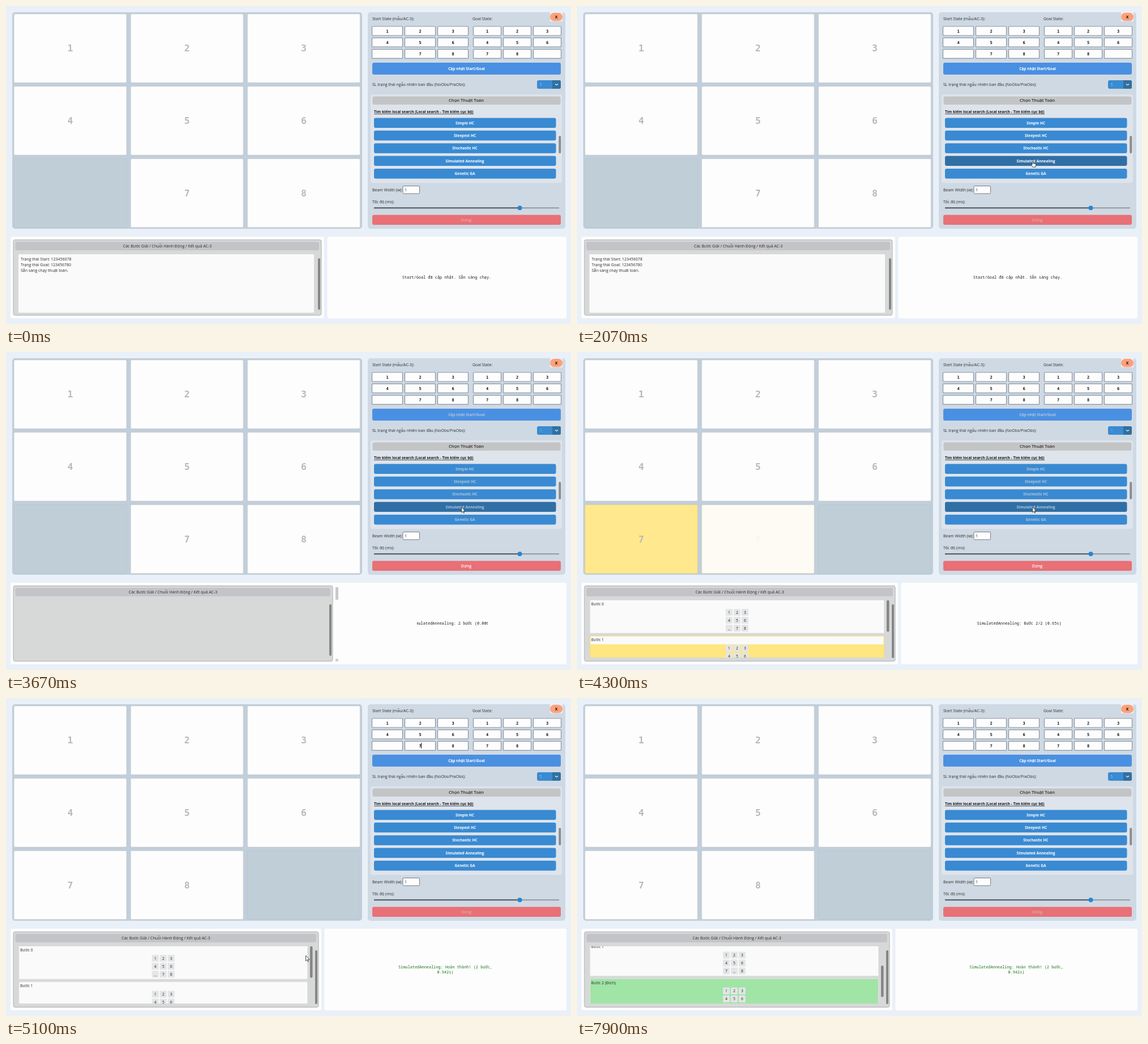
An HTML page with a canvas for the animation above (8030 ms loop, 998 by 561 pixels).

```html
<!DOCTYPE html>
<html lang="vi">
<head>
<meta charset="utf-8">
<title>8-puzzle</title>
<style>
html, body { margin: 0; width: 100%; height: 100%; overflow: hidden; background: #eaf0f8; }
canvas { display: block; }
</style>
</head>
<body>
<canvas id="stage" width="998" height="561"></canvas>
<script>
const ctx = document.getElementById('stage').getContext('2d');
const LOOP = 8030;
const FAIL = 2660, FOUND = 3640, LISTED = 3700, STEP1 = 3960, STEP2 = 4285, DONE = 4590;
const UI = '"Open Sans", "Noto Sans", sans-serif';
const MONO = '"Noto Sans Mono", monospace';
const DIGITS = '"DejaVu Sans Mono", monospace';
const BOARDS = ['123456 78', '1234567 8', '12345678 '];
const ALGORITHMS = ['Simple HC', 'Steepest HC', 'Stochastic HC', 'Simulated Annealing', 'Genetic GA'];
const CURSOR = [[750, 905, 400], [1270, 812.5, 266], [1700, 806, 272], [2300, 804.5, 274],
  [4640, 804.5, 273.5], [5100, 529.5, 454.5], [6600, 527, 462]];

const clamp = v => Math.min(1, Math.max(0, v));
const ease = v => { v = clamp(v); return v * v * (3 - 2 * v); };
const pulse = (t, from, to, rise, fall) => clamp((t - from) / rise) * (1 - clamp((t - to) / fall));

function box(x1, y1, x2, y2, fill, radius = 0, stroke, width = 1) {
  ctx.beginPath();
  ctx.roundRect(x1, y1, x2 - x1, y2 - y1, radius);
  if (fill) { ctx.fillStyle = fill; ctx.fill(); }
  if (stroke) { ctx.strokeStyle = stroke; ctx.lineWidth = width; ctx.stroke(); }
}

// y is the middle of the x-height band plus ascenders, about 0.36em above the baseline
function text(str, x, y, { size = 7, weight = 400, color = '#2c2c2c', align = 'left', family = UI } = {}) {
  ctx.font = `${weight} ${size}px ${family}`;
  ctx.textAlign = align;
  ctx.fillStyle = color;
  ctx.fillText(str, x, y + size * 0.36);
}

function line(x1, y1, x2, y2, color, width) {
  ctx.strokeStyle = color;
  ctx.lineWidth = width;
  ctx.beginPath();
  ctx.moveTo(x1, y1);
  ctx.lineTo(x2, y2);
  ctx.stroke();
}

function withAlpha(alpha, draw) {
  ctx.save();
  ctx.globalAlpha = alpha;
  draw();
  ctx.restore();
}

function clipped(x1, y1, x2, y2, draw) {
  ctx.save();
  ctx.beginPath();
  ctx.rect(x1, y1, x2 - x1, y2 - y1);
  ctx.clip();
  draw();
  ctx.restore();
}

function cursorAt(t) {
  const i = CURSOR.findIndex(k => k[0] > t);
  if (i < 1) return null;
  const [t0, x0, y0] = CURSOR[i - 1], [t1, x1, y1] = CURSOR[i];
  const p = ease((t - t0) / (t1 - t0));
  return { x: x0 + (x1 - x0) * p, y: y0 + (y1 - y0) * p };
}

function drawBoard(t) {
  const step = t < STEP1 ? 0 : t < STEP2 ? 1 : 2;
  const red = pulse(t, FAIL, 3150, 50, 300);
  const flashes = { 6: pulse(t, STEP1, STEP2, 200, 150), 7: pulse(t, STEP2, DONE, 200, 250) };
  const born = { 6: STEP1, 7: STEP2 };
  box(11, 11, 629, 393, '#c1cedb', 5);
  [...BOARDS[step]].forEach((digit, i) => {
    const x = 14 + i % 3 * 206.2, y = 14 + Math.floor(i / 3) * 127.7;
    const tile = (fill, stroke) => box(x, y, x + 199, y + 121.3, fill, 2, stroke, 0.7);
    if (digit === ' ') return tile('#c0ced8', '#b3c7cd');
    tile('#fdfdfd', '#c6c9c8');
    if (red) withAlpha(red, () => tile('#f4a1a5', '#e59a9c'));
    if (flashes[i]) withAlpha(flashes[i], () => tile('#ffe680', '#e0cc80'));
    const label = color => text(digit, x + 99.5, y + 60.3,
      { size: 16.5, weight: 700, color, align: 'center', family: DIGITS });
    withAlpha(step && born[i] ? clamp((t - born[i]) / 200) : 1, () => label('#b9b9b9'));
    if (red) withAlpha(red, () => label('#a9b9b5'));
  });
}

function drawInputs(t) {
  const grid = (digits, left, pitch, width) => [...digits].forEach((digit, i) => {
    const x = left + i % 3 * pitch, y = 36 + Math.floor(i / 3) * 20.2;
    box(x, y, x + width, y + 16, '#fdfdfd', 1, '#8995a3', 1.2);
    text(digit, x + width / 2, y + 8, { weight: 700, color: '#111', align: 'center', family: DIGITS });
  });
  text('Start State (mẫu/AC-3):', 647, 22.5);
  text('Goal State:', 824, 22.5);
  grid(BOARDS[0], 646.5, 58, 54);
  grid(BOARDS[2], 825.5, 53, 49);
  if (t > 4640 && t < 6200 && (t - 4640) % 1000 < 520) line(733.5, 79, 733.5, 89, '#111', 1);
}

function drawControls(t, pointer) {
  const running = t >= FOUND && t < DONE;
  const caption = running ? '#b1c5d9' : '#fff';
  const button = { size: 6.55, weight: 700, align: 'center' };

  box(639, 11, 988, 393, '#cfd9e3', 5);
  box(961, 11, 983, 27, '#eef0f2');
  box(961, 12, 983, 26.5, '#ffa07a', 7.2);
  text('X', 972, 19, { weight: 700, color: '#111', align: 'center' });
  drawInputs(t);

  box(647, 100, 980, 121, '#4a90e2', 3);
  text('Cập nhật Start/Goal', 813.5, 110.5, { ...button, color: caption });

  text('SL trạng thái ngẫu nhiên ban đầu (NoObs/PraObs):', 647, 138.5);
  box(938, 131, 980, 146, '#3a8bd2', 3);
  box(965, 131, 980, 146, '#31709f', [0, 3, 3, 0]);
  text('5', 942.5, 138.5, { color: running ? '#6ea6d8' : '#9cc5e8' });
  line(970, 137.5, 972.5, 139.7, '#fff', 1.1);
  line(972.5, 139.7, 975, 137.5, '#fff', 1.1);

  box(644, 156, 982, 312, '#dee4ec', 4);
  box(647.5, 159.5, 979.5, 174, '#c3c4c6', 3);
  text('Chọn Thuật Toán', 813, 166.5, { size: 7.6, weight: 600, align: 'center' });
  text('Tìm kiếm local search (Local search - Tìm kiếm cục bộ)', 650, 187,
    { size: 6.55, weight: 700, color: '#161616' });
  line(650, 190.6, 826, 190.6, '#161616', 0.7);
  let hand = false;
  ALGORITHMS.forEach((name, i) => {
    const y = 197.5 + i * 22.35;
    const hover = pointer && pointer.x > 650 && pointer.x < 972 && pointer.y > y && pointer.y < y + 17.5;
    hand ||= hover && !running;
    box(650, y, 971.5, y + 17.5, hover ? '#306fa5' : '#398ad2', 3);
    text(name, 810.5, y + 8.7, { ...button, color: caption });
  });
  box(976.3, 229, 980.3, 260, '#8b8c8f', 2);

  text('Beam Width (w):', 647, 324);
  box(701, 317.5, 730.5, 331, '#fdfdfd', 1.5, '#777d84');
  text('1', 704, 324);
  text('Tốc độ (ms):', 647, 345);
  line(650, 356.3, 977, 356.3, '#92979e', 2);
  line(650, 356.3, 907, 356.3, '#555b62', 2);
  ctx.fillStyle = '#2a85d0';
  ctx.beginPath();
  ctx.arc(907.5, 356.3, 4, 0, 7);
  ctx.fill();
  box(647, 368.5, 980, 386, '#e87076', 3);
  text('Dừng', 813, 377, { size: 7, weight: 600, align: 'center', color: running ? '#fff' : '#d9adb0' });
  return hand;
}

function drawSteps(t, edge) {
  const right = edge - 19.5, middle = (23 + right) / 2;
  const scroll = ease((t - 5300) / 800);
  const active = t < STEP1 ? 0 : t < STEP2 + 45 ? 1 : 2;
  clipped(22, 438, right + 1, 539, () => BOARDS.forEach((board, i) => {
    const y = 437.5 + i * 63.3 - scroll * 69;
    const goal = i === 2 && t >= DONE, lit = i === active && t < DONE;
    box(23, y, right, y + 58.5, goal ? '#a0e4a6' : lit ? '#ffe680' : '#fafafa', 1, lit ? '#f0dc80' : '#e4e4e4');
    if (lit) box(24, y + 1, right - 1, y + 15, '#fafafa');
    text(`Bước ${i}${i === 2 ? ' (Đích)' : ''}`, 25, y + 7);
    [...board].forEach((digit, k) => {
      const cx = middle + (k % 3 - 1) * 14, cy = y + 21.7 + Math.floor(k / 3) * 14;
      box(cx - 6, cy - 6, cx + 6, cy + 6, '#e4e5e6', 1);
      text(digit === ' ' ? '_' : digit, cx, cy, { align: 'center' });
    });
  }));
  const thumb = 438 + scroll * 34;
  box(edge - 15, thumb, edge - 10.5, thumb + 55.5, '#858585', 2);
}

function drawOutput(t) {
  const ready = t < FAIL, failed = !ready && t < FOUND, found = t >= FOUND && t < LISTED;
  const done = t >= DONE, listed = t >= LISTED;
  const edge = ready ? 557 : failed ? 604 : found ? 577 : done ? 552 : 562;
  const right = edge + 10, middle = (right + 990) / 2;

  box(8, 407, failed || found ? right + 5 : edge + 5, 551, '#fdfdfd', 3);
  box(right + 0.5, 407, 990, 551, '#fdfdfd', 3);
  box(13, 412.5, edge, 545.5, '#d7d8d8', 3, '#aeb0b3');
  box(16.5, 416, edge - 4, 431, '#c4c4c8', 3);
  text('Các Bước Giải / Chuỗi Hành Động / Kết quả AC-3', (13 + edge) / 2, 423.5, { align: 'center' });
  box(edge - 6, 445, edge - 2, listed ? 540 : 536, '#858585', 2);

  if (ready || failed) {
    box(22, 438, edge - 13, 541, '#fafafb', 1);
    const lines = ready
      ? ['Trạng thái Start: 123456078', 'Trạng thái Goal: 123456780', 'Sẵn sàng chạy thuật toán.']
      : ['SA: Không tìm thấy.'];
    lines.forEach((str, i) => text(str, 26, 446.5 + i * 9.8));
  }
  if (listed) drawSteps(t, edge);

  const status = (str, y, color = '#222') =>
    text(str, middle, y, { size: 6.92, color, align: 'center', family: MONO });
  if (ready) status('Start/Goal đã cập nhật. Sẵn sàng chạy.', 478.7);
  else if (failed) status('SA: Không tìm thấy.', 478.7, '#e3a62a');
  else if (found) {
    box(582, 415, 587, 437, '#c9c9cc');
    box(582, 541, 587, 546, '#d2d2d2');
    clipped(726, 470, 851, 488, () => status('SimulatedAnnealing: 2 bước (0.006s)', 478.7));
  } else if (done) {
    status('SimulatedAnnealing: Hoàn thành! (2 bước,', 474.7, '#1c771c');
    status('0.942s)', 483.5, '#1c771c');
  } else {
    status(`SimulatedAnnealing: Bước ${t < STEP1 ? '0/2 (0.01s)' : t < STEP2 ? '1/2 (0.33s)' : '2/2 (0.65s)'}`, 478.7);
  }
}

const ARROW = new Path2D('M0 0V9.3L2.2 7.3L3.7 10.7L5.2 10L3.7 6.8H6.6Z');
const HAND = new Path2D('M-.9 1Q0-.6 .9 1V4.2L5 5Q5.8 5.2 5.7 6.2L5 9V10.8H.1L-2.6 7Q-3.2 5.8-1.9 5.8L-.9 6.8Z');

function drawCursor({ x, y }, hand) {
  const shape = hand ? HAND : ARROW;
  ctx.save();
  ctx.translate(x, y);
  ctx.fillStyle = '#fff';
  ctx.fill(shape);
  ctx.strokeStyle = '#222';
  ctx.lineWidth = 0.8;
  ctx.stroke(shape);
  ctx.restore();
}

function frame(now) {
  const t = now % LOOP;
  const pointer = cursorAt(t);
  box(0, 0, 998, 561, '#eaf0f8');
  drawBoard(t);
  const hand = drawControls(t, pointer);
  drawOutput(t);
  if (pointer) drawCursor(pointer, hand);
  requestAnimationFrame(() => frame(performance.now() - start));
}

const start = performance.now();
frame(0);
</script>
</body>
</html>
```
